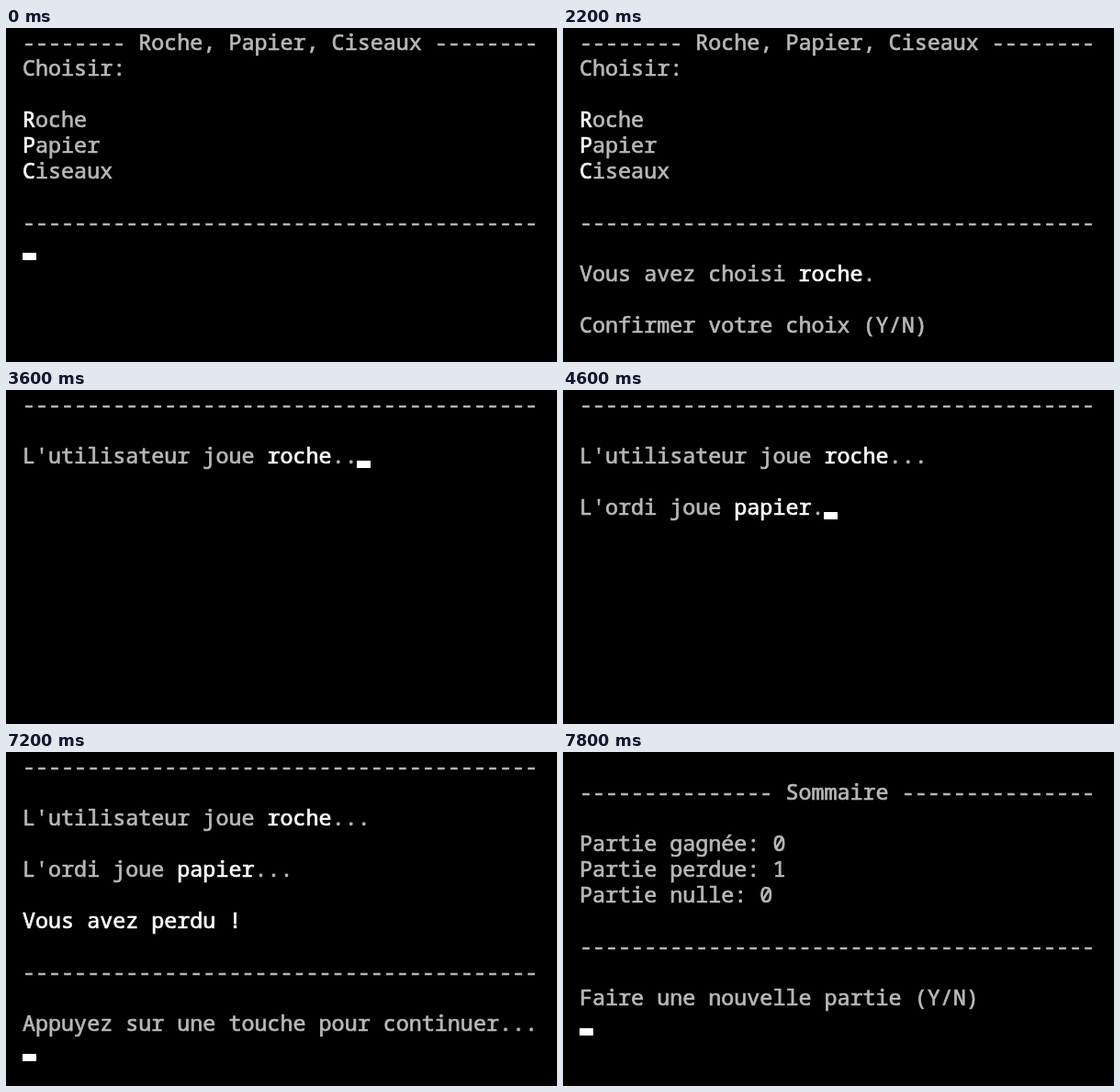
Recreate the animation shown at these times as an HTML page. Size 600x364 px, loop 8000 ms.

```html
<!DOCTYPE html>
<html lang="fr">
<head>
<meta charset="utf-8">
<title>Roche, Papier, Ciseaux</title>
<style>
  html, body { margin: 0; width: 100%; height: 100%; overflow: hidden; background: #000; }
  /* slightly heavy, soft glyphs, like an enlarged console */
  pre {
    position: absolute; left: 18px; top: .5px; margin: 0;
    font: 23.38px/28px "Noto Sans Mono", "DejaVu Sans Mono", monospace;
    font-variant-ligatures: none;
    color: #b8b8b8;
    -webkit-text-stroke: .7px;
    filter: blur(.45px);
  }
  b { font-weight: inherit; color: #fff; }
  #cursor { position: absolute; width: 15px; height: 8px; background: #fff; filter: blur(.3px); }
</style>
</head>
<body>
<pre id="screen"></pre>
<div id="cursor"></div>
<script>
const LOOP = 8000, LEFT = 17.6, COL = 14.03, ROW = 28;
const screen = document.getElementById('screen');
const cursor = document.getElementById('cursor');

const dash = n => '-'.repeat(n);
const rule = dash(40);
const lines = (...rows) => rows.join('<br>');

const menu = lines(
  `${dash(8)} Roche, Papier, Ciseaux ${dash(8)}`, 'Choisir:', '',
  '<b>R</b>oche', '<b>P</b>apier', '<b>C</b>iseaux', '', rule);
const confirm = lines(menu, '', 'Vous avez choisi <b>roche</b>.', '', 'Confirmer votre choix (Y/N)');
const user = dots => lines(rule, '', `L'utilisateur joue <b>roche</b>${'.'.repeat(dots)}`);
const computer = dots => lines(user(3), '', `L'ordi joue <b>papier</b>${'.'.repeat(dots)}`);
const result = lines(computer(3), '', '<b>Vous avez perdu !</b>', '', rule, '',
  'Appuyez sur une touche pour continuer...');
const summary = lines('', `${dash(15)} Sommaire ${dash(15)}`, '',
  'Partie gagnée: 0', 'Partie perdue: 1', 'Partie nulle: 0', '', rule, '',
  'Faire une nouvelle partie (Y/N)');

// start time, text, cursor column and row (no cursor when omitted)
const steps = [
  [0, menu, 0, 8],
  [600, menu],
  [1000, menu, 0, 8],
  [1200, confirm, 0, 12],
  [2200, confirm],
  [2600, user(0), 24, 2],
  [3000, user(1), 25, 2],
  [3600, user(2), 26, 2],
  [4000, computer(0), 18, 4],
  [4600, computer(1), 19, 4],
  [5000, computer(2), 20, 4],
  [5600, result, 40, 10],
  [6400, result],
  [6800, result, 40, 10],
  [7200, result, 0, 11],
  [7400, summary, 0, 10],
];

let shown;
function draw() {
  const t = performance.now() % LOOP;
  const step = steps.findLast(s => s[0] <= t);
  if (step !== shown) {
    shown = step;
    const [, text, col, row] = step;
    screen.innerHTML = text;
    cursor.hidden = col === undefined;
    if (!cursor.hidden) {
      cursor.style.left = Math.round(LEFT + col * COL) + 'px';
      cursor.style.top = row * ROW + 21 + 'px';
    }
  }
  requestAnimationFrame(draw);
}
draw();
</script>
</body>
</html>
```
